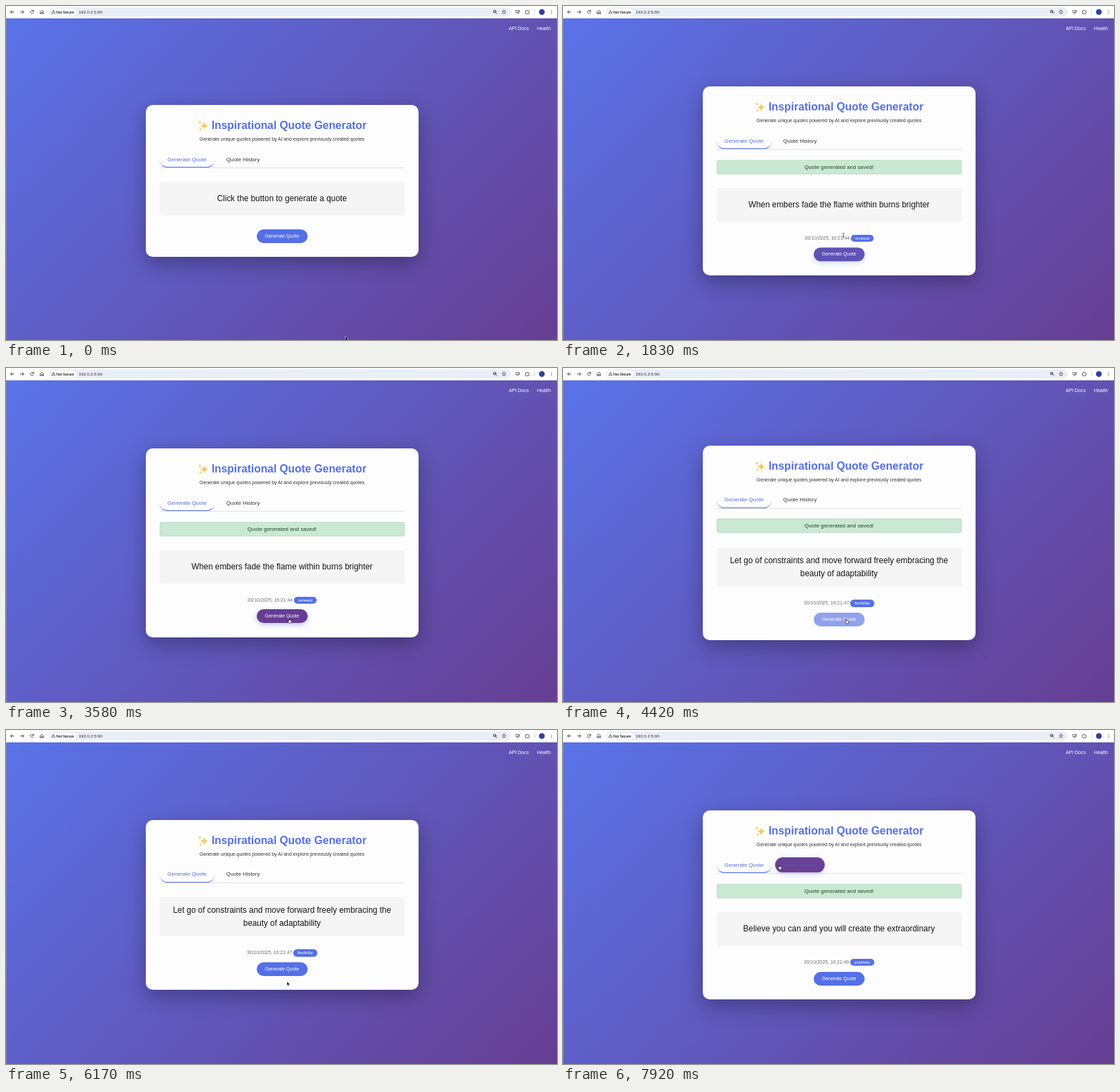
An HTML page that plays this animation: 800x486 px, repeating every 8000 ms.

```html
<!DOCTYPE html>
<html lang="en">
<head>
<meta charset="utf-8">
<title>Quote generator</title>
<style>
  :root { --blue: #5570e6; --violet: #663d93; }
  * { box-sizing: border-box; }
  html, body { margin: 0; width: 100%; height: 100%; overflow: hidden; }
  body { position: relative; font: 6.94px/10px "Liberation Sans", Arial, sans-serif; color: #333; }
  #stage { position: absolute; left: 0; top: 0; width: 800px; height: 486px; overflow: hidden; background: #fff; }
  #stage div, #stage svg { position: absolute; white-space: nowrap; }
  #page { left: 0; top: 18px; width: 800px; height: 468px; border-left: 1px solid #7a80b4;
    background: linear-gradient(135deg, #5a73e8, #663e92); }
  #url { left: 62px; top: 2px; width: 671px; height: 13px; border-radius: 7px; background: #e9eef7; }
  #chip { left: 64px; top: 3.5px; width: 38px; height: 10px; border-radius: 5px; background: #fff; }
  .nav { top: 28px; color: #fff; }
  #card { left: 202.75px; width: 396px; border-radius: 10px; background: #fdfdfd;
    box-shadow: 0 10px 30px rgba(0, 0, 0, .3); }
  #card > div { left: 0; width: 396px; text-align: center; }
  #card > .title { top: 20px; left: 95.7px; width: auto; font: bold 15.88px/20px "Liberation Sans", Arial, sans-serif; color: var(--blue); }
  #card > .sub { top: 45px; }
  #card > .tab { top: 68.7px; height: 22.6px; font-size: 7.94px; line-height: 21.6px; border-radius: 12.4px; }
  #card > .first { left: 19.8px; width: 80.5px; color: var(--blue); border-bottom: 1.5px solid var(--blue); }
  #card > .second { left: 105.2px; width: 72.4px; }
  #card > .line { left: 19.8px; width: 356.4px; top: 91.2px; height: 1px; background: #e2e2e4; }
  #card > .msg { left: 19.8px; width: 356.4px; top: 106.5px; height: 21px; border-radius: 2.5px;
    background: #cbe8d3; border: .5px solid #bfe0c8; color: #1c4a25; font-size: 7.94px; line-height: 20px; }
  #card > .quote { left: 19.8px; width: 356.4px; border-radius: 4px; background: #f5f5f5; color: #161616;
    font-size: 11.9px; line-height: 19px; display: flex; align-items: center; justify-content: center; white-space: pre; }
  #card > .meta { color: #707070; height: 12px; display: flex; align-items: center; justify-content: center; gap: 2px; }
  .tag { background: var(--blue); color: #fff; font-size: 5.95px; line-height: 11px; height: 10.9px; padding: 0 5.95px; border-radius: 6px; }
  #card > .row { display: flex; justify-content: center; height: 20px; }
  .btn { color: #fff; height: 20px; line-height: 20px; padding: 0 11.9px; border-radius: 10px; }
</style>
</head>
<body>
<div id="stage">
  <div id="url"></div>
  <div id="chip"></div>
  <div style="left:73px;top:3.5px;font-size:5.2px;color:#222;-webkit-text-stroke:.12px #222">Not Secure</div>
  <div style="left:105.5px;top:3.5px;font-size:6.2px;color:#2a2c30">192.0.2.5:90</div>
  <svg width="800" height="18" fill="none" stroke="#3c4043" stroke-width=".9" stroke-linecap="round" stroke-linejoin="round">
    <path d="M11.5 8.7H6.8m2.1-2.2L6.7 8.7l2.2 2.2M21 8.7h4.7m-2.1-2.2 2.2 2.2-2.2 2.2"/>
    <path d="M40 7.6A2.3 2.3 0 1 0 40 9.8M40.2 6v1.8h-1.8"/>
    <path d="M50 8.2l2.2-2 2.2 2v3h-1.5V9.4h-1.4v1.8H50z"/>
    <path d="M69 6.4l2.4 4.4h-4.8zM69 8v1.1" stroke-width=".7"/>
    <circle cx="709.5" cy="8" r="1.9"/><path d="M711 9.5l1.8 1.8M708.7 8h1.6" />
    <path d="M723 5.8l.8 1.9 2 .2-1.5 1.3.5 2-1.8-1.1-1.8 1.1.5-2-1.5-1.3 2-.2z" stroke-width=".7"/>
    <path d="M740.5 6.4h4.8v3h-4.8zM741.5 11h2.5M743 8h2.3" stroke-width=".7"/>
    <path d="M754.8 7h1.4q.6-2 1.4 0h1.5v1.5q1.8.6 0 1.4v1.4h-4.3z" stroke-width=".8"/>
    <path d="M767.5 5v7" stroke="#cdd6ea"/>
    <circle cx="778" cy="8.7" r="4.2" fill="#2d439a" stroke="none"/>
    <g fill="#3c4043" stroke="none"><circle cx="792" cy="6.5" r=".6"/><circle cx="792" cy="8.7" r=".6"/><circle cx="792" cy="10.9" r=".6"/></g>
  </svg>
  <div id="page"></div>
  <div class="nav" style="left:730px">API Docs</div>
  <div class="nav" style="left:771px">Health</div>

  <div id="card">
    <svg style="left:75px;top:22px" width="18" height="17" fill="#f6cb5a">
      <path d="M9.8 2Q10.3 7.9 15.8 8.5 10.3 9.1 9.8 15 9.3 9.1 3.8 8.5 9.3 7.9 9.8 2z"/>
      <path d="M3.6 1Q3.9 3.4 6.1 3.7 3.9 4 3.6 6.4 3.3 4 1.1 3.7 3.3 3.4 3.6 1z"/>
      <path d="M4.3 10.7Q4.6 13 6.5 13.2 4.6 13.4 4.3 15.7 4 13.4 2.1 13.2 4 13 4.3 10.7z"/>
    </svg>
    <div class="title">Inspirational Quote Generator</div>
    <div class="sub">Generate unique quotes powered by AI and explore previously created quotes</div>
    <div class="line"></div>
    <div class="tab first">Generate Quote</div>
    <div class="tab second">Quote History</div>
    <div class="msg">Quote generated and saved!</div>
    <div class="quote"></div>
    <div class="meta"><span class="when"></span><span class="tag"></span></div>
    <div class="row"><span class="btn"></span></div>
  </div>

  <svg id="cursor" width="14" height="14" viewBox="-5 -5 14 14" style="left:-5px;top:-5px;overflow:visible" stroke-linejoin="round">
    <path d="M0 0v6l1.4-1.2.9 2 1-.4-.9-2h1.9z" fill="#000" stroke="#fff" stroke-width=".5"/>
    <path d="M-.6 0q.6-.7 1.1 0v2.2l2.6.7q.6.3.4 1.2l-.6 2.4H0L-1.8 3.9q.2-.8 1.2 0z" fill="#fff" stroke="#000" stroke-width=".6"/>
    <path d="M-1.4-3q1 0 1.4.6.4-.6 1.4-.6M0-2.4v5M-1.4 3.2q1 0 1.4-.6.4.6 1.4.6M-.7.9H.7" fill="none" stroke="#222" stroke-width=".7"/>
  </svg>
</div>
<script>
  const LOOP = 8000;
  const $ = s => document.querySelector(s);
  const [card, msg, quote, meta, when, tag, row, btn, tab, cursor] =
    ['#card', '.msg', '.quote', '.meta', '.when', '.tag', '.row', '.btn', '.second', '#cursor'].map($);

  const idle = { text: 'Click the button to generate a quote' };
  const busy = { text: '...', busy: true };
  const embers = { text: 'When embers fade the flame within burns brighter', sec: 44, tag: 'renewal', msg: true };
  const letGo = { text: 'Let go of constraints and move forward freely embracing the\nbeauty of adaptability', sec: 47, tag: 'flexibility', msg: true };
  const believe = { text: 'Believe you can and you will create the extraordinary', sec: 49, tag: 'positivity', msg: true };
  const states = [
    [0, idle], [1250, busy], [1500, embers], [4080, busy], [4360, letGo],
    [5500, { ...letGo, msg: false }], [6750, busy], [7330, believe]
  ];

  // time, x, y, pointer shape (0 arrow, 1 hand, 2 text)
  const path = [
    [0, 492.5, 481, 0], [170, 492.5, 481, 0], [700, 412, 346, 1], [900, 407, 334, 1], [1250, 407, 334, 0],
    [1700, 407, 334, 2], [2250, 407, 333, 2], [3000, 409, 343, 0], [3250, 410, 353, 1], [3500, 411, 364.5, 1],
    [4080, 411, 365.5, 0], [4360, 411, 365.5, 1], [5500, 411, 366, 0], [5900, 408, 366, 0], [6350, 408, 366, 0],
    [6500, 406, 356, 1], [6680, 404.8, 350, 1], [6750, 404.8, 350, 0], [7380, 404.8, 350, 0],
    [7600, 370, 268, 0], [7760, 327, 205, 1], [7900, 314, 196.5, 1], [8000, 314, 196.5, 1]
  ];

  // time, hover on/off
  const btnHover = [[700, 1], [1700, 0], [3250, 1], [4080, 0], [4400, 1], [5500, 0], [6480, 1], [6750, 0]];
  const tabHover = [[7740, 1]];
  const FADE = 300;

  const ease = p => p * p * (3 - 2 * p);
  const clamp = p => Math.max(0, Math.min(1, p));
  const last = (list, t) => list.findLastIndex(k => k[0] <= t);

  function fade(list, t) {
    return list.reduce((v, [start, to]) => v + (to - v) * ease(clamp((t - start) / FADE)), 0);
  }

  function lift(el, h) {
    el.style.transform = `translateY(${-h}px)`;
    el.style.boxShadow = h > .01 ? `0 2.5px 7px rgba(85,112,230,${.4 * h})` : 'none';
  }

  let shown = -1;
  function layout(s) {
    const top = s.msg ? 148 : 112;
    const high = s.text.includes('\n') ? 57.5 : 49;
    const btnTop = top + high + (s.sec ? 38 : 20);
    const height = btnTop + 40;
    card.style.top = 254.5 - height / 2 + 'px';
    card.style.height = height + 'px';
    quote.style.top = top + 'px';
    quote.style.height = high + 'px';
    quote.textContent = s.text;
    msg.style.display = s.msg ? '' : 'none';
    meta.style.display = s.sec ? '' : 'none';
    meta.style.top = top + high + 18 + 'px';
    when.textContent = '30/10/2025, 16:21:' + s.sec;
    tag.textContent = s.tag || '';
    row.style.top = btnTop + 'px';
    btn.textContent = s.busy ? 'Generating...' : 'Generate Quote';
  }

  function render(t) {
    const i = last(states, t);
    const [start, s] = states[i];
    if (i !== shown) layout(s);
    shown = i;

    const h = fade(btnHover, t);
    btn.style.background = `color-mix(in srgb, var(--violet) ${h * 100}%, var(--blue))`;
    const woke = i > 0 && states[i - 1][1].busy;
    btn.style.opacity = s.busy ? .6 : woke ? .6 + .4 * ease(clamp((t - start) / FADE)) : 1;
    lift(btn, h);

    const g = fade(tabHover, t);
    tab.style.background = `rgba(102,61,147,${Math.min(1, g * 1.5)})`;
    tab.style.color = `color-mix(in srgb, var(--blue) ${g * 100}%, #333)`;
    lift(tab, g);

    const k = Math.min(last(path, t), path.length - 2);
    const [t0, x0, y0, shape] = path[k], [t1, x1, y1] = path[k + 1];
    const p = (t - t0) / (t1 - t0);
    cursor.style.transform = `translate(${x0 + (x1 - x0) * p}px, ${y0 + (y1 - y0) * p}px)`;
    [...cursor.children].forEach((c, n) => c.style.display = n === shape ? '' : 'none');
  }

  const begin = performance.now();
  function tick() {
    render((performance.now() - begin) % LOOP);
    requestAnimationFrame(tick);
  }
  tick();
</script>
</body>
</html>
```
